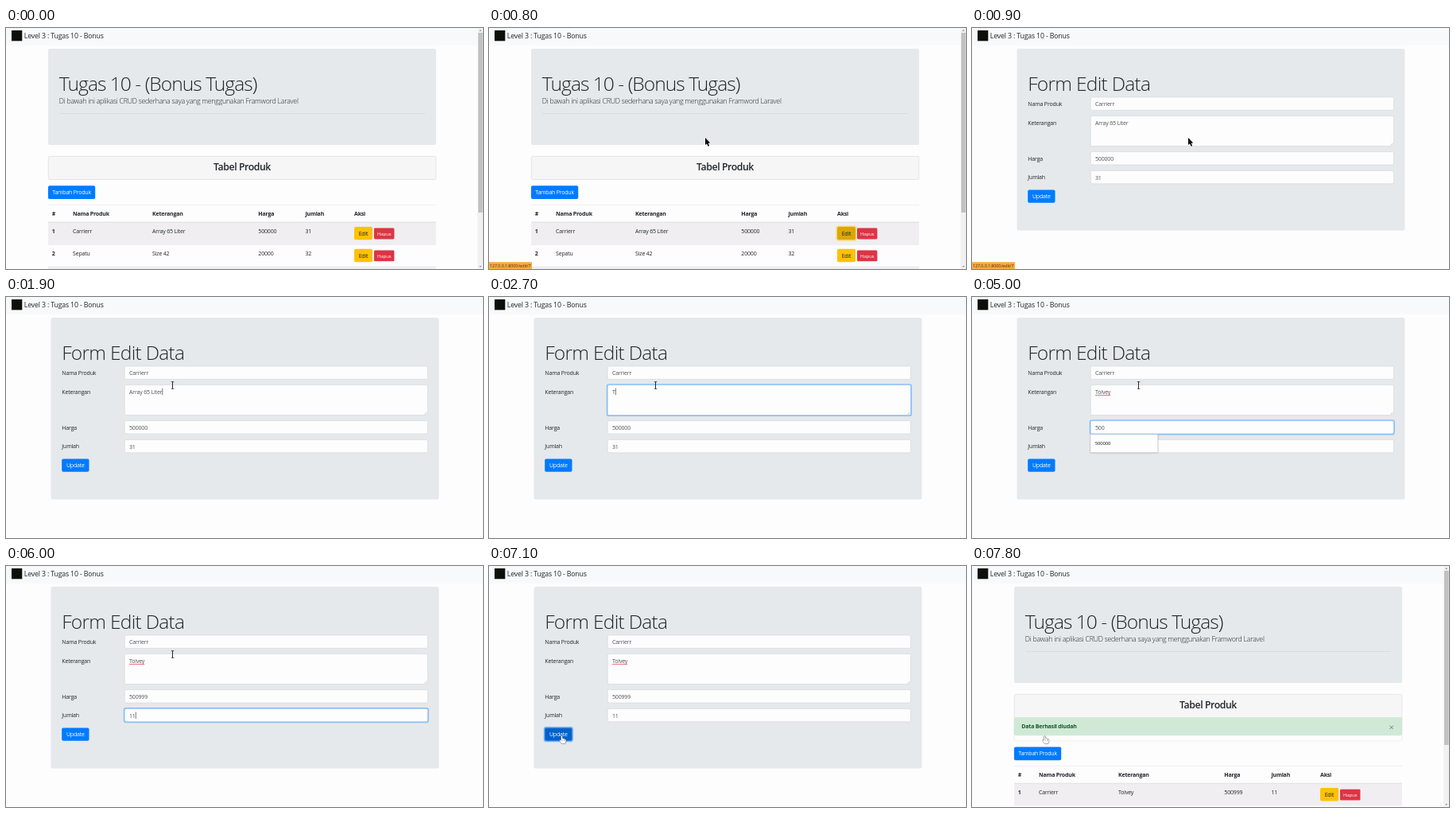
These frames come from a looping animation (600 px wide and 303 px high, 8000 ms). An HTML page with a canvas:

```html
<!DOCTYPE html>
<html lang="id">
<head>
<meta charset="utf-8">
<title>Tugas 10</title>
<style>
html, body { margin: 0; width: 100%; height: 100%; overflow: hidden; background: #fefdfe; }
canvas { display: block; width: 600px; height: 303px; }
</style>
</head>
<body>
<canvas id="stage"></canvas>
<script>
const W = 600, H = 303, LOOP = 8000, STEP = 100;
const canvas = document.getElementById('stage');
const ctx = canvas.getContext('2d');
const scale = Math.max(1, window.devicePixelRatio || 1);
canvas.width = W * scale;
canvas.height = H * scale;

const INK = '#212529', FIELD = '#495057', BLUE = '#007bff', PAGE = '#fefdfe', PANEL = '#e5e9eb';
const BODY = 7.03;
const WORD = 'Tolvey';

const clamp = v => Math.max(0, Math.min(1, v));
const ramp = (t, from, to) => clamp((t - from) / (to - from));

// Latest value whose start time has passed
function at(t, steps) {
  let value = steps[0][1];
  for (const [start, v] of steps) if (t >= start) value = v;
  return value;
}

// Eased position along timed points [time, x, y]
function along(t, points) {
  let prev = points[0];
  for (const p of points) {
    if (t < p[0]) {
      const k = ramp(t, prev[0], p[0]), e = k * k * (3 - 2 * k);
      return [prev[1] + (p[1] - prev[1]) * e, prev[2] + (p[2] - prev[2]) * e];
    }
    prev = p;
  }
  return [prev[1], prev[2]];
}

function setFont(size, weight, track) {
  ctx.font = `${weight} ${size}px "Open Sans", "Noto Sans", sans-serif`;
  ctx.letterSpacing = `${track * size}px`;
}

function text(str, x, y, { size = BODY, weight = 400, color = INK, track = -0.025, align = 'left' } = {}) {
  setFont(size, weight, track);
  ctx.textAlign = align;
  ctx.fillStyle = color;
  ctx.fillText(str, x, y);
  return ctx.measureText(str).width;
}

const bold = (str, x, y, color = INK) => text(str, x, y, { weight: 700, color, track: -0.03 });

function rect(x, y, w, h, color) {
  ctx.fillStyle = color;
  ctx.fillRect(x, y, w, h);
}

function box(x, y, w, h, fill, stroke, r = 1.8) {
  ctx.beginPath();
  ctx.roundRect(x, y, w, h, r);
  if (fill) { ctx.fillStyle = fill; ctx.fill(); }
  if (stroke) { ctx.strokeStyle = stroke; ctx.lineWidth = 0.6; ctx.stroke(); }
}

function glow(x, y, w, h, rgb, alpha) {
  ctx.beginPath();
  ctx.roundRect(x - 0.7, y - 0.7, w + 1.4, h + 1.4, 2.4);
  ctx.strokeStyle = `rgba(${rgb},${alpha})`;
  ctx.lineWidth = 1.5;
  ctx.stroke();
}

function nav(width) {
  rect(0, 0, width, 22, '#f8f9fa');
  rect(7, 3, 13.3, 13.3, '#0c0f0a');
  text('Level 3 : Tugas 10 - Bonus', 22.8, 13.2, { size: 8.8, track: -0.02 });
}

function triangle(x, y, dir) {
  ctx.beginPath();
  ctx.moveTo(x - 1.5, y + dir);
  ctx.lineTo(x, y - dir);
  ctx.lineTo(x + 1.5, y + dir);
  ctx.fillStyle = '#777';
  ctx.fill();
}

function scrollbar(end) {
  rect(593.2, 0, 6.8, H, '#f1f1f1');
  rect(594, 6, 5.6, end - 6, '#c1c1c1');
  triangle(596.7, 3, 0.8);
  triangle(596.7, 300, -0.8);
}

function row(y, cells, striped, pressed) {
  if (striped) rect(53, y, 488, 28, '#f0eef0');
  rect(53, y, 488, 0.5, '#dee2e6');
  const [id, name, info, price, count] = cells;
  const base = y + 13.4;
  bold(id, 57.7, base);
  text(name, 84, base);
  text(info, 184, base);
  text(price, 317.3, base);
  text(count, 376.5, base);
  box(438, y + 5.7, 23, 16.4, pressed ? '#dba706' : '#ffc107');
  if (pressed) glow(438, y + 5.7, 23, 16.4, '255,193,7', 0.5);
  text('Edit', 449.5, y + 16.6, { align: 'center' });
  box(463, y + 7.4, 25.4, 13.8, '#dc3545', null, 1.4);
  text('Hapus', 475.8, y + 16.5, { size: 6.15, color: '#fff', align: 'center' });
}

function listPage(saved, pressed) {
  nav(593.2);
  box(53, 26, 488, 121, PANEL, null, 2.6);
  text('Tugas 10 - (Bonus Tugas)', 66.8, 79, { size: 24.6, weight: 300, track: -0.04 });
  text('Di bawah ini aplikasi CRUD sederhana saya yang menggunakan Framword Laravel', 66.8, 95.4,
    { size: 8.8, weight: 300, track: -0.03 });
  rect(67, 107.3, 460, 0.6, '#cfd3d5');

  const shift = saved ? 29.2 : 0;
  box(53.2, 161.3, 487.6, 29.2 + shift, '#f6f6f7', '#d6d7d9', 1.8);
  text('Tabel Produk', 297, 179.2, { size: 12.3, weight: 600, track: -0.035, align: 'center' });
  if (saved) {
    rect(53.5, 213, 487, 6.6, PAGE);
    box(53.3, 190.6, 487.4, 22.2, '#d0e9d6', '#c3e6cb');
    bold('Data Berhasil diudah', 62.3, 204.3, '#155724');
    ctx.beginPath();
    for (const d of [-1, 1]) {
      ctx.moveTo(525.4, 202.9 - 2.2 * d);
      ctx.lineTo(529.8, 202.9 + 2.2 * d);
    }
    ctx.strokeStyle = '#68746b';
    ctx.lineWidth = 0.9;
    ctx.stroke();
  }

  ctx.save();
  ctx.translate(0, shift);
  box(53, 198.2, 59.2, 16.8, BLUE);
  text('Tambah Produk', 82.6, 209.2, { color: '#fff', track: -0.032, align: 'center' });
  rect(53, 222, 488, 0.5, '#dee2e6');
  const heads = [['#', 57.7], ['Nama Produk', 84], ['Keterangan', 184], ['Harga', 317.3], ['Jumlah', 376.5], ['Aksi', 438]];
  for (const [name, x] of heads) bold(name, x, 235.6);
  row(244.2, saved ? ['1', 'Carrierr', WORD, '500999', '11'] : ['1', 'Carrierr', 'Array 65 Liter', '500000', '31'], true, pressed);
  rect(53, 243.6, 488, 0.9, '#dee2e6');
  if (!saved) {
    row(272.1, ['2', 'Sepatu', 'Size 42', '20000', '32'], false, false);
    rect(53, 299.9, 488, 4, '#f0eef0');
    rect(53, 299.9, 488, 0.5, '#dee2e6');
  }
  ctx.restore();
  scrollbar(saved ? 225 : 232);
}

function field(y, h, value, { focus = 0, caret = false, selected = false } = {}) {
  const x = 149.2, w = 381.3;
  if (focus) glow(x, y, w, h, '0,123,255', 0.4 * focus);
  box(x, y, w, h, PAGE, focus > 0.4 ? '#80bdff' : '#ced4da');
  const base = y + 11.1, left = 155;
  setFont(BODY, 400, -0.025);
  const width = ctx.measureText(value).width;
  if (selected) rect(left, base - 7.6, width, 9.6, '#3390ff');
  text(value, left, base, { color: selected ? '#fff' : FIELD });
  if (caret) rect(left + width + 0.2, base - 7, 0.6, 8.6, '#222');
  return width;
}

function formPage(t) {
  nav(W);
  box(56.5, 26, 488, 228.6, PANEL, null, 2.6);
  text('Form Edit Data', 70.2, 79, { size: 24.6, weight: 300, track: -0.03 });
  const labels = [['Nama Produk', 97.9], ['Keterangan', 121.6], ['Harga', 166.5], ['Jumlah', 190.3]];
  for (const [name, y] of labels) text(name, 70.3, y);

  const info = at(t, [[0, 'Array 65 Liter'], [2400, ''], [2600, WORD.slice(0, 1)], [2900, WORD.slice(0, 2)],
    [3000, WORD.slice(0, 3)], [3100, WORD.slice(0, 4)], [3200, WORD.slice(0, 5)], [3700, WORD]]);
  const price = at(t, [[0, '500000'], [4400, '5'], [4600, '50'], [4800, '500'], [5100, '5009'], [5200, '50099'], [5400, '500999']]);
  const count = at(t, [[0, '31'], [5900, '1'], [6000, '11']]);
  const focusAt = (from, to) => ramp(t, from, from + 200) * (1 - ramp(t, to, to + 200));

  field(87, 16.4, 'Carrierr');
  const infoWidth = field(110.6, 38, info, {
    focus: focusAt(1900, 3900),
    caret: (t >= 1900 && t < 2200) || (t >= 2400 && t < 3400) || (t >= 3700 && t < 3800),
    selected: t >= 2200 && t < 2400
  });
  if (t >= 3700) rect(155, 123.1, infoWidth, 0.8, '#e8525c');
  ctx.beginPath();
  for (const d of [1.2, 2.8]) {
    ctx.moveTo(529.3 - d, 147.6);
    ctx.lineTo(529.3, 147.6 - d);
  }
  ctx.strokeStyle = '#999';
  ctx.lineWidth = 0.5;
  ctx.stroke();

  field(155.6, 16.4, price, {
    focus: focusAt(3900, 5500),
    caret: t >= 4400 && t < 5500 && t !== 5000,
    selected: t >= 3900 && t < 4400
  });
  field(179.4, 16.4, count, {
    focus: focusAt(5500, 6800),
    caret: t >= 5900 && t < 6500,
    selected: t >= 5500 && t < 5900
  });

  if (t >= 4500 && t < 5100) {
    ctx.save();
    ctx.shadowColor = 'rgba(0,0,0,.25)';
    ctx.shadowBlur = 2 * scale;
    ctx.shadowOffsetY = 0.5 * scale;
    rect(149, 172.8, 84.7, 22.7, '#fefefe');
    ctx.restore();
    ctx.strokeStyle = '#c9ccd0';
    ctx.lineWidth = 0.5;
    ctx.strokeRect(149, 172.8, 84.7, 22.7);
    text('500000', 154.7, 186.4, { size: 5.9, weight: 500, color: '#111', track: -0.02 });
  }

  const ring = ramp(t, 6800, 7000);
  if (ring) glow(70.2, 203.4, 34.3, 16.4, '0,123,255', 0.5 * ring);
  box(70.2, 203.4, 34.3, 16.4, at(t, [[0, BLUE], [6600, '#0073ee'], [6700, '#0069d9'], [6900, '#0062cc']]));
  text('Update', 87.4, 214.2, { color: '#fff', align: 'center' });
}

function polygon(points, fill, stroke) {
  ctx.beginPath();
  points.forEach(([x, y]) => ctx.lineTo(x, y));
  ctx.closePath();
  ctx.lineJoin = 'round';
  ctx.lineWidth = 0.7;
  ctx.fillStyle = fill;
  ctx.strokeStyle = stroke;
  ctx.stroke();
  ctx.fill();
}

const pointers = {
  arrow() {
    polygon([[0, 0], [0, 9], [2, 7.2], [3.6, 10.8], [5.1, 10.1], [3.6, 6.7], [6.2, 6.5]], '#000', '#fff');
  },
  beam() {
    rect(-0.4, -4.3, 0.9, 8.6, '#111');
    rect(-1.7, -4.6, 3.5, 0.7, '#111');
    rect(-1.7, 3.9, 3.5, 0.7, '#111');
  },
  hand() {
    polygon([[-0.8, 0.6], [0, 0], [0.8, 0.6], [0.9, 3.5], [2.6, 3.6], [4.4, 4.2], [5.3, 5], [5.1, 7.6],
      [4.2, 10], [0, 10], [-1.3, 8], [-2.9, 5.9], [-2.3, 5.1], [-0.8, 6.3]], '#fff', '#222');
    for (const x of [1, 2.5, 3.9]) rect(x, 4.4, 0.35, 1.9, '#555');
  }
};

const path = [
  [100, 520, 206], [400, 449, 257], [500, 449, 257], [800, 272, 138], [1000, 272, 138], [1600, 209.5, 111],
  [6100, 209.5, 111], [6400, 100, 236], [6600, 91.5, 213.5]
];
const shapes = [[0, 'arrow'], [300, 'hand'], [600, 'arrow'], [1500, 'beam'], [6200, 'arrow'], [6600, 'hand']];

function pointer(t) {
  if (t < 100) return;
  const [x, y] = along(t, path);
  ctx.save();
  ctx.translate(x, y);
  pointers[at(t, shapes)]();
  ctx.restore();
}

function draw(now) {
  const t = Math.floor((now % LOOP) / STEP) * STEP;
  ctx.setTransform(scale, 0, 0, scale, 0, 0);
  rect(0, 0, W, H, PAGE);
  if (t < 900 || t >= 7400) listPage(t >= 7400, t >= 400 && t < 900);
  else formPage(t);
  if (t >= 300 && t < 1100) {
    rect(0, 294.3, 54, 8.7, '#fbab40');
    text('127.0.0.1:8000/edit/7', 1, 300.8, { size: 5.5, color: '#4a3008', track: -0.025 });
  }
  pointer(t);
}

const start = performance.now();
function tick() {
  draw(performance.now() - start);
  requestAnimationFrame(tick);
}
tick();
</script>
</body>
</html>
```
